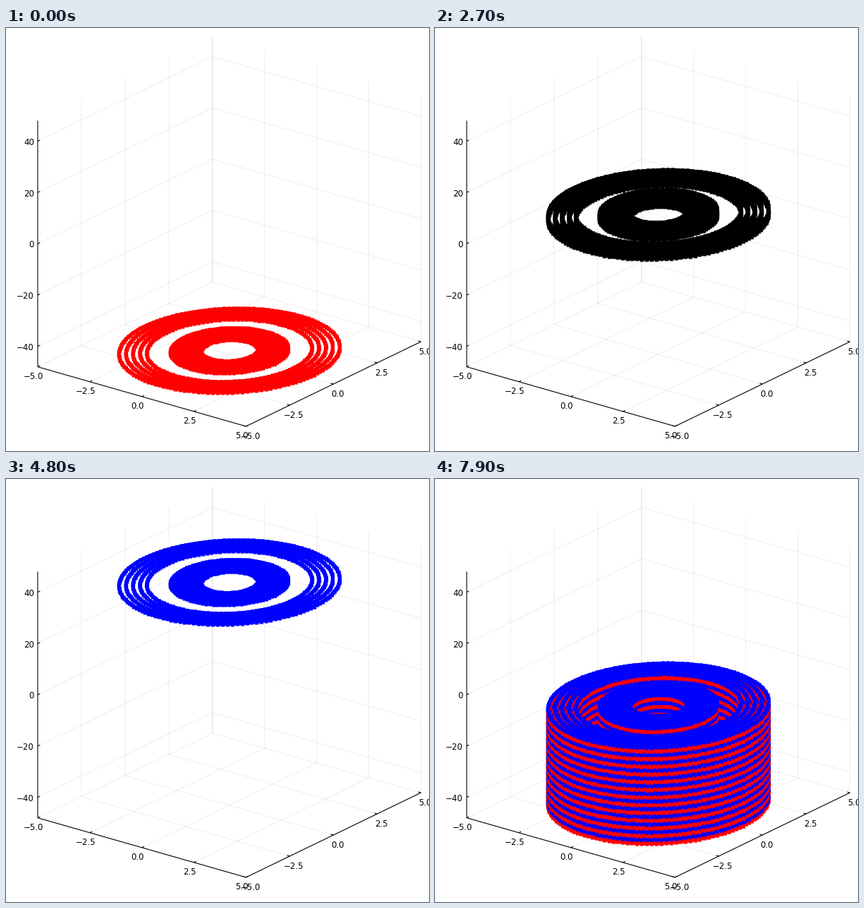
A matplotlib script for the animation above (8 s loop, 600x600 px).

```python
import numpy as np
import matplotlib.pyplot as plt
from matplotlib.animation import FuncAnimation

PT = 0.72  # points per pixel at 100 dpi
Z_MIN, Z_MAX, Z_STEP = -48, 48, 1.5
RISE, SLOW_END, FAST_END = 54, 18, 27
FRAMES = 80

fig = plt.figure(figsize=(6, 6), dpi=100, facecolor="white")
ax = fig.add_axes([0, 0, 1, 1])
ax.set(xlim=(0, 600), ylim=(600, 0))
ax.axis("off")


def project(x, y, z):
    """Map data coordinates to stage pixels."""
    px = 316.7 + 29.55 * x + 24.8 * y
    py = 462.8 + 8.44 * x - 12.0 * y - 3.637 * (z - Z_MIN)
    return px, py


def line3(*points, **style):
    px, py = project(*np.array(points, float).T)
    ax.plot(px, py, solid_capstyle="butt", snap=False, **style)


def grid(*points):
    line3(*points, color="black", alpha=0.07, lw=PT)


def axis(*points):
    line3(*points, color="black", lw=PT * 1.1)


def label(x, y, text, ha="center"):
    ax.text(x, y, text.replace("-", "\u2212"), ha=ha, va="center_baseline",
            family="DejaVu Sans", size=11.7 * PT, color="black")


def draw_axes():
    flat = np.arange(-5, 5.1, 2.5)
    tall = range(-40, 41, 20)
    for v in flat:
        grid((v, -5, Z_MIN), (v, 5, Z_MIN))
        grid((v, 5, Z_MIN), (v, 5, Z_MAX))
        grid((-5, v, Z_MIN), (5, v, Z_MIN))
        if v > -5:
            grid((-5, v, Z_MIN), (-5, v, Z_MAX))
    for z in tall:
        grid((-5, -5, z), (-5, 5, z))
        grid((-5, 5, z), (5, 5, z))

    axis((-5, -5, Z_MIN), (5, -5, Z_MIN))
    axis((5, -5, Z_MIN), (5, 5, Z_MIN))
    axis((-5, -5, Z_MIN), (-5, -5, Z_MAX))

    for v in flat:
        axis((v, -5, Z_MIN), (v, -4.87, Z_MIN))
        axis((5, v, Z_MIN), (4.87, v, Z_MIN))
        x, y = project(v, -5, Z_MIN)
        label(x - 6.3, y + 12.5, f"{v:.1f}")
        x, y = project(5, v, Z_MIN)
        label(x + 6, y + 13, f"{v:.1f}")
    for z in tall:
        axis((-5, -5, z), (-5, -4.87, z))
        label(40, project(-5, -5, z)[1] + 0.3, str(z), ha="right")


def ring_outline():
    """All concentric circles as one path, separated by NaN."""
    radii = np.r_[np.linspace(1.04, 2.17, 11), np.linspace(3.04, 4.06, 5)]
    xs, ys = [], []
    for r in radii:
        t = np.linspace(0, 2 * np.pi, int(40 + 25 * r) + 1)
        xs += [*(r * np.cos(t)), np.nan]
        ys += [*(r * np.sin(t)), np.nan]
    return np.array(xs), np.array(ys)


draw_axes()
RX, RY = ring_outline()
TOOTH = [(-0.88, -1), (0.88, -1), (0.78, 1), (-0.78, 1)]
layers = [
    ax.plot([], [], lw=4.9 * PT, marker=TOOTH, ms=6.2 * PT, mew=0,
            solid_joinstyle="miter", zorder=5 + n * 0.01)[0]
    for n in range(FRAMES - RISE)
]


def height(step):
    return Z_MIN + Z_STEP * (step + 1)


def hue(step):
    return "blue" if step % 2 else "red"


def scene(i):
    """List of (z, colour) rings, lowest first."""
    if i >= RISE:
        return [(height(k), hue(k)) for k in range(i - RISE + 1)]
    if i <= SLOW_END:
        return [(height(i), hue(i))]
    if i <= FAST_END:
        z = height(2 * i - SLOW_END)
        return [(z - drop, "black") for drop in (2, 1, 0)]
    step = i + FAST_END - SLOW_END
    return [(height(step), hue(step))]


def update(i):
    rings = scene(i)
    for n, layer in enumerate(layers):
        layer.set_visible(n < len(rings))
        if n < len(rings):
            z, colour = rings[n]
            layer.set_data(*project(RX, RY, z))
            layer.set_color(colour)
            layer.set_markerfacecolor(colour)
    return layers


anim = FuncAnimation(fig, update, frames=FRAMES, interval=100,
                     repeat=True, repeat_delay=0, blit=False)
plt.show()
```
